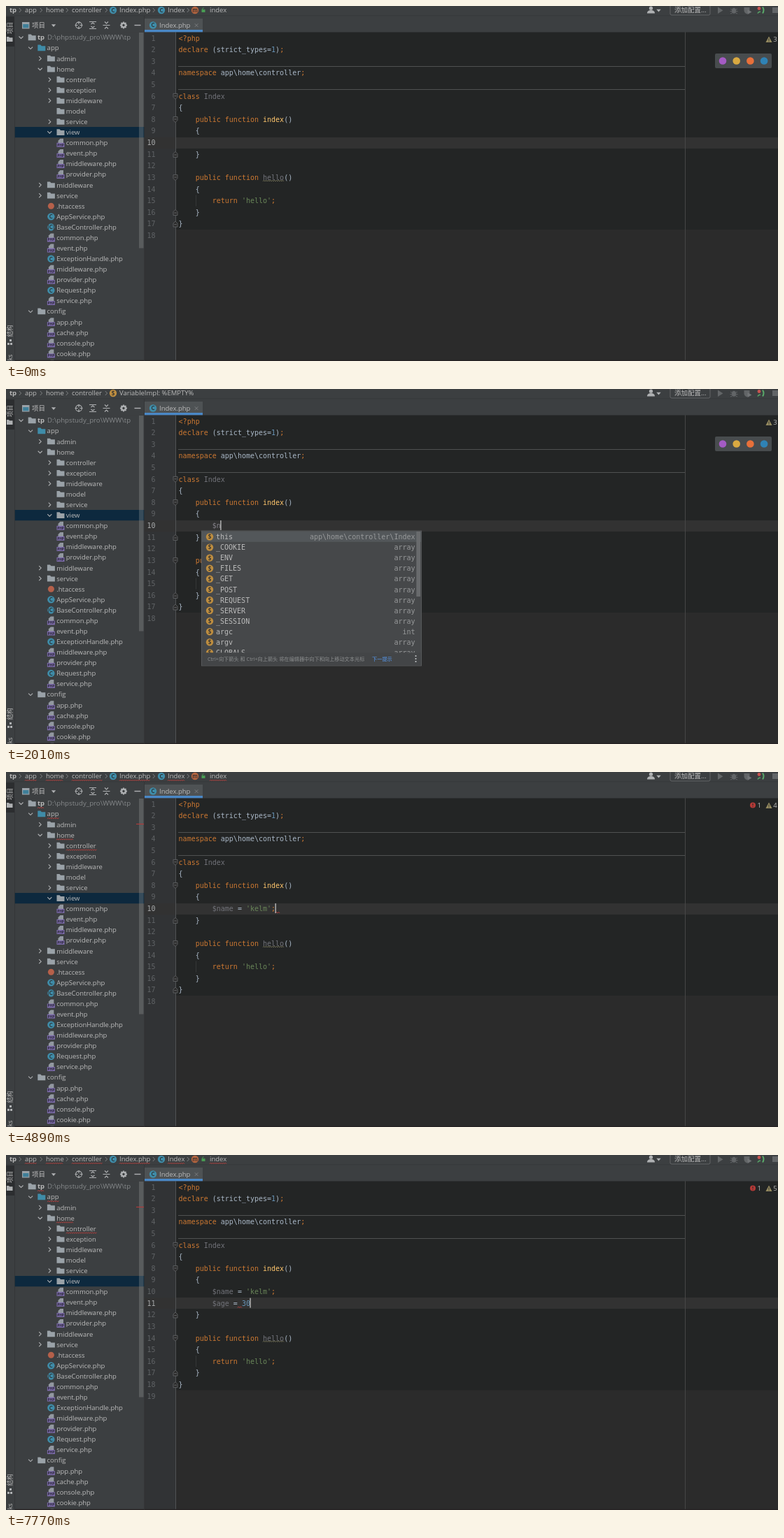
Recreate the animation shown at these times as an HTML page. Size 1103 by 508 pixels, loop 8 s.

```html
<!DOCTYPE html>
<html lang="zh">
<head>
<meta charset="utf-8">
<title>Editor</title>
<style>
html, body { margin: 0; width: 100%; height: 100%; overflow: hidden; background: #2b2b2b; }
svg { display: block; width: 100%; height: 100%; }
text { white-space: pre; font: 9.5px "Open Sans", "Noto Sans CJK SC", "Noto Sans CJK", sans-serif; fill: #bbb; }
.mono { font: 10px "DejaVu Sans Mono", monospace; fill: #a9b7c6; }
.end { text-anchor: end; }
.mid { text-anchor: middle; }
.line { fill: none; stroke: #afb1b3; stroke-width: 1.1; }
</style>
</head>
<body>
<svg id="stage" viewBox="0 0 1103 508"></svg>
<script>
const LOOP = 8000, COL = 6.02, LEFT = 246.6, ROW = 16.61;
const GREY = '#72737a', FRESH = '#85828a', RED = '#c8403e';
const stage = document.getElementById('stage');
const timed = [];

function el(tag, attrs, parent = stage) {
  const node = document.createElementNS('http://www.w3.org/2000/svg', tag);
  for (const k in attrs) node.setAttribute(k, attrs[k]);
  parent.appendChild(node);
  return node;
}
const group = parent => el('g', {}, parent);
const rect = (x, y, width, height, fill, parent, rx = 0) => el('rect', { x, y, width, height, fill, rx }, parent);
const circle = (cx, cy, r, fill, parent) => el('circle', { cx, cy, r, fill }, parent);
const path = (d, fill, parent) => el('path', { d, fill }, parent);
const line = (d, parent, stroke = '#afb1b3', w = 1.1) =>
  el('path', { d, class: 'line', style: `stroke:${stroke};stroke-width:${w}` }, parent);
function text(x, y, str, parent, style = '', cls = '') {
  const node = el('text', { x, y: y + 3.4, style, class: cls }, parent);
  node.textContent = str;
  return node;
}
function during(node, ...spans) {
  timed.push([node, spans]);
  return node;
}
function zigzag(x1, x2, y) {
  let d = `M${x1} ${y + 1}`;
  for (let x = x1 + 1.5, up = 1; x <= x2; x += 1.5, up = !up) d += `L${x} ${up ? y - 0.7 : y + 1}`;
  return d;
}
const wave = (x1, x2, y, parent, color = RED) => line(zigzag(x1, x2, y), parent, color, 0.8);
const colX = n => LEFT + COL * n;
const rowY = n => 46 + ROW * (n - 1);

// Icons
function letter(x, y, ch, fill, parent) {
  circle(x, y, 5.2, fill, parent);
  text(x, y - 0.5, ch, parent, 'font-size:8px;font-weight:600;fill:#2a2c2e', 'mid');
}
const classIcon = (x, y, p) => letter(x, y, 'C', '#3f8ca8', p);
const varIcon = (x, y, p) => letter(x, y, '$', '#bd8d40', p);
function methodIcon(x, p) {
  letter(x, 6, 'm', '#b5653f', p);
  rect(x + 9.5, 5, 5, 4, '#499c54', p);
  line(`M${x + 10.5} 5v-1.5q1.5 -1.5 2.5 0`, p, '#499c54', 0.9);
}
const folder = (x, y, fill, p) => path(`M${x} ${y - 4.5}h4l1.6 1.7h5.4v7h-11z`, fill, p);
function phpIcon(x, y, p) {
  path(`M${x + 5} ${y - 6}h4.5v7h-7.5v-4z`, '#9298a0', p);
  rect(x, y, 11, 6, '#7d6cab', p);
  text(x + 5.5, y + 1.5, 'PHP', p, 'font-size:4.8px;font-weight:700;fill:#2a2638', 'mid');
}
function chevron(x, y, open, p) {
  line(open ? `M${x - 3} ${y - 1.5}l3 3l3 -3` : `M${x - 1.5} ${y - 3}l3 3l-3 3`, p);
}
const triangle = (x, y, fill = '#afb1b3', p) => path(`M${x - 3.2} ${y - 1.7}h6.4l-3.2 3.6z`, fill, p);

// Editor
rect(0, 0, 1103, 508, '#2b2b2b');
const block = rect(243, 37, 860, 283, '#232525');
rect(198, 37, 45, 471, '#313335');
const band = rect(198, 188, 905, 16, '#323232');
line('M970.5 37V508', stage, '#464646', 1);
line('M242.5 37V508', stage, '#515354', 1);
line('M246 86.5H970M246 119.5H970', stage, '#4f5151', 1);

const RULES = /('[^']*'|<\?php|\b(?:declare|namespace|class|public|function|return)\b|;|\b\d+\b|\$\w+|\bIndex\b|\bindex\b|hello(?=\())/;
function tint(s, varColor) {
  if (s[0] === "'") return '#6a8759';
  if (s[0] === '$') return varColor;
  if (/^\d/.test(s)) return '#6897bb';
  if (s === 'index') return '#ffc66d';
  return /^(Index|hello)$/.test(s) ? GREY : '#cc7832';
}
function paint(node, src, varColor) {
  node.textContent = '';
  src.split(RULES).forEach((s, i) => {
    if (!s) return;
    const span = el('tspan', i % 2 ? { fill: tint(s, varColor) } : {}, node);
    span.textContent = s;
  });
}
function codeLine(n, src, parent) {
  const bare = src.trimStart();
  const node = text(colX(src.length - bare.length), rowY(n) + 0.2, '', parent, '', 'mono');
  paint(node, bare, GREY);
  return node;
}
function fold(n, up, parent) {
  const g = el('g', { transform: `translate(242 ${rowY(n) + 0.3}) scale(1 ${up ? -1 : 1})` }, parent);
  el('path', { d: 'M-3 -4h6v5l-3 3l-3 -3z', fill: '#2b2b2b', stroke: '#66696b', 'stroke-width': 0.8 }, g);
  line('M-1.6 -0.6h3.2', g, '#7a7d7f', 0.8);
}
const numbers = [];
for (let n = 1; n <= 19; n++) numbers[n] = text(213.5, rowY(n) + 0.2, n, stage, '', 'mono end');
during(numbers[19], [5160, LOOP]);

const code = group();
const rest = group();
codeLine(1, '<?php', code);
codeLine(2, 'declare (strict_types=1);', code);
codeLine(4, 'namespace app\\home\\controller;', code);
codeLine(6, 'class Index', code);
codeLine(7, '{', code);
codeLine(8, '    public function index()', code);
codeLine(9, '    {', code);
codeLine(11, '    }', rest);
codeLine(13, '    public function hello()', rest);
codeLine(14, '    {', rest);
codeLine(15, "        return 'hello';", rest);
codeLine(16, '    }', rest);
codeLine(17, '}', rest);
line('M271.5 270.5v16', rest, '#343636', 1);
wave(367, 397, 250, rest, '#7d7a5c');
fold(6, false, code);
fold(8, false, code);
fold(13, false, rest);
[11, 16, 17].forEach(n => fold(n, true, rest));

// Typing: time, text, caret column, wave [from, to]
const TYPED = {
  10: [
    [0, ''], [1140, '', 8], [1400, '$', 9], [2010, '$n', 10], [2080, '$na', 11], [2150, '$nam', 12],
    [2220, '$name', 13], [2550, '$name', 13, [8, 14]], [2680, '$name ', 14, [8, 14]],
    [2820, '$name =', 15], [2950, '$name = ', 16], [3220, "$name = ''", 17],
    [3290, "$name = ''", 17, [18, 19]], [3830, "$name = 'k'", 18, [19, 20]],
    [3900, "$name = 'ke'", 19, [20, 21]], [4100, "$name = 'kel'", 20, [21, 22]],
    [4170, "$name = 'kelm'", 21, [22, 23]], [4630, "$name = 'kelm'", 22, [22, 23]],
    [4890, "$name = 'kelm';", 23, [23, 24]], [5160, "$name = 'kelm';", 0, [23, 24]],
    [6690, "$name = 'kelm';"]
  ],
  11: [
    [0, ''], [5160, '', 8], [5360, '$', 9], [5640, '$a', 10], [5700, '$ag', 11], [5770, '$age', 12],
    [6160, '$age ', 13], [6300, '$age =', 14], [6430, '$age = ', 15], [6690, '$age = ', 15, [14, 15]],
    [7550, '$age = ', 0, [14, 15]], [7700, '$age = 3', 16, [14, 15]], [7770, '$age = 30', 17, [14, 15]]
  ]
};
const typed = [10, 11].map(n => ({
  steps: TYPED[n], y: rowY(n),
  greyAt: n === 10 ? 3290 : 6690,
  node: codeLine(n, '        '),
  wave: wave(0, 0, 0),
  caret: rect(0, rowY(n) - 7.5, 1.2, 14, '#d0d0d0'),
  key: ''
}));
function typeAt(row, t) {
  const step = row.steps.findLast(s => s[0] <= t);
  const [, src, col, under] = step;
  const key = step[0] + (t >= row.greyAt ? 'g' : '');
  if (key === row.key) return;
  row.key = key;
  paint(row.node, src, t >= row.greyAt ? GREY : FRESH);
  row.wave.setAttribute('d', under ? zigzag(colX(under[0]), colX(under[1]), row.y + 5.5) : '');
  row.caret.style.display = col ? '' : 'none';
  row.caret.setAttribute('x', colX(col || 0) - 0.5);
}

// Inspection badge
path('M1090 43.5l4.5 8.5h-9z', '#978c60');
line('M1090 46.5v3M1090 50.3v.9', stage, '#2b2b2b', 1);
[['3', 0, 3620], ['4', 3620, 7090], ['5', 7090, LOOP]].forEach(([s, a, b]) => during(text(1096.3, 48, s), [a, b]));
const errors = during(group(), [3620, LOOP]);
circle(1067, 47.5, 4, '#b53a37', errors);
line('M1067 45v3M1067 49v1', errors, '#2b2b2b', 1.1);
text(1073.5, 48, '1', errors);

// Browser buttons
const browsers = group();
rect(1013, 68, 81, 21, '#484c4e', browsers, 2);
['#a45bc4', '#d9a941', '#e8703a', '#2f82b5'].forEach((c, i) => circle(1024 + i * 19.7, 78.5, 5.3, c, browsers));

// Project tree
rect(0, 0, 198, 508, '#3c3f41');
rect(12, 173, 186, 15.2, '#0d293e');
const TREE = [
  '0v tp', '1v app', '2> admin', '2v home', '3> controller', '3> exception', '3> middleware',
  '3- model', '3> service', '3v view', '3p common.php', '3p event.php', '3p middleware.php',
  '3p provider.php', '2> middleware', '2> service', '2h .htaccess', '2c AppService.php',
  '2a BaseController.php', '2p common.php', '2p event.php', '2c ExceptionHandle.php',
  '2p middleware.php', '2p provider.php', '2c Request.php', '2p service.php', '1v config',
  '2p app.php', '2p cache.php', '2p console.php', '2p cookie.php', '2p database.php'
];
TREE.forEach((item, i) => {
  const y = 45 + 15.08 * i, x = 45 + 13.6 * item[0], kind = item[1], icon = x - 13.3;
  if ('v>'.includes(kind)) chevron(x - 23.5, y, kind === 'v');
  if ('v>-'.includes(kind)) folder(icon, y, i === 1 ? '#3f8ca8' : '#9aa2a8');
  if (kind === 'p') phpIcon(icon, y);
  if (kind === 'h') circle(icon + 5.5, y, 4.5, '#b5604a');
  if ('ca'.includes(kind)) classIcon(icon + 5.5, y);
  if (kind === 'a') line(`M${icon + 1.7} ${y - 5}v10M${icon + 9.3} ${y - 5}v10`, stage, '#3c3f41', 0.9);
  text(x, y, item.slice(3), stage, i ? '' : 'font-weight:700');
});
text(59, 45, 'D:\\phpstudy_pro\\WWW\\tp', stage, 'fill:#85888a;font-size:9.7px');
rect(190, 38, 6.5, 308.5, 'rgba(166,166,166,.28)');
const marks = during(group(), [2550, LOOP]);
[[45, 55, 0], [59, 76, 1], [72, 97, 3], [86, 130, 4]].forEach(([a, b, i]) => wave(a, b, 51 + 15.08 * i, marks));
during(line('M186 74.5h11', stage, '#b03a3a', 1.2), [2750, LOOP]);
rect(12, 506.7, 1091, 1.3, '#272324');

// Left stripe
rect(0, 14, 12, 494, '#3c3f41');
rect(0, 15, 12, 43, '#2c2e30');
rect(12, 14, 0.8, 494, '#323436');
const turned = (y, s) => el('g', { transform: `translate(5.5 ${y}) rotate(-90)` }).appendChild(text(0, 0, s, stage, 'font-size:8.6px', 'mid'));
turned(31.5, '项目');
path('M1 44h3l1.2 1.3h4.3v5.7h-8.5z', '#afb1b3');
turned(465, '结构');
path('M2 482h3v3h-3zM6 482h3v3h-3zM5 477h3v3h-3z', '#afb1b3');
turned(503, 'ks');

// Top bars
rect(0, 0, 1103, 14, '#3c3f41');
rect(12, 14, 1091, 23.5, '#3c3f41');
rect(0, 13.5, 1103, 0.8, '#343638');
rect(197.3, 14, 0.8, 494, '#323436');
rect(23, 23, 10.5, 9.5, '#9aa2a8');
rect(24.2, 26, 8.1, 5.3, '#3f7f99');
text(37, 27.5, '项目');
triangle(68, 28);
circle(104, 27.5, 4.4, 'none').setAttribute('class', 'line');
line('M104 22v4M104 29v4M98.5 27.5h4M105.5 27.5h4');
line('M119 22.5h10M119 32.5h10M121.5 26l2.5 -2l2.5 2M121.5 29l2.5 2l2.5 -2');
line('M138.5 27.5h10M141 22.5l2.5 2.5l2.5 -2.5M141 32.5l2.5 -2.5l2.5 2.5');
circle(168, 27.5, 2.8, 'none').setAttribute('style', 'stroke:#afb1b3;stroke-width:2.2');
line('M168 22.5v2M168 30.5v2M163 27.5h2M171 27.5h2M164.5 24l1.5 1.5M170 29.5l1.5 1.5M171.5 24l-1.5 1.5M166 29.5l-1.5 1.5', stage, '#afb1b3', 1.8);
line('M183.5 27.5h9', stage, '#afb1b3', 1.4);

rect(198, 18, 83, 19, '#4e5254');
rect(198, 34, 83, 3.3, '#4a88c7');
classIcon(210, 27.5);
text(219, 27.5, 'Index.php');
line('M269.8 25.3l4.6 4.6M274.4 25.3l-4.6 4.6', stage, '#7f8284', 0.9);

circle(921.5, 3.2, 2.6, '#afb1b3');
path('M916 10.5q0 -4.5 5.5 -4.5t5.5 4.5z', '#afb1b3');
triangle(932.5, 6.5);
el('rect', { x: 949, y: -4, width: 57, height: 17, rx: 2, fill: 'none', stroke: '#626567' });
text(955, 6, '添加配置...');
path('M1017 1.5l7.5 4.7l-7.5 4.7z', '#626567');
el('ellipse', { cx: 1040, cy: 6.8, rx: 3, ry: 4, fill: '#626567' });
line('M1035 4l3 1.5M1045 4l-3 1.5M1034.5 7.5h11M1035 11l3 -1.5M1045 11l-3 -1.5', stage, '#626567', 1);
path('M1054.5 2h8v4q-1 4 -4 5.5q-4 -2 -4 -5.5z', '#626567');
path('M1059.5 5l6 3.5l-6 3.5z', '#727577');
line('M1081 1.5q3 4.5 0 9', stage, '#59a869', 2);
circle(1076, 3.5, 2.4, '#c75450');
line('M1074 10.5q1.5 -3 4 -2', stage, '#59a869', 1.6);
rect(1095, 2, 8, 8, '#626567');

// Breadcrumbs
const sep = (x, p) => line(`M${x - 1.2} 3l2.8 3l-2.8 3`, p, '#85888a', 0.9);
text(5, 6, 'tp', stage, 'font-weight:700');
[[27, 'app'], [57, 'home'], [94, 'controller']].forEach(([x, s]) => text(x, 6, s));
[20, 50, 87, 143].forEach(x => sep(x));
const crumbMarks = during(group(), [3290, LOOP]);
[[27, 44], [57, 82], [94, 138]].forEach(([a, b]) => wave(a, b, 11.7, crumbMarks));

const fileCrumbs = during(group(), [0, 1470], [3220, 5490], [6230, LOOP]);
classIcon(153, 6, fileCrumbs);
text(162, 6, 'Index.php', fileCrumbs);
sep(211, fileCrumbs);
classIcon(222, 6, fileCrumbs);
text(231, 6, 'Index', fileCrumbs);
sep(260, fileCrumbs);
methodIcon(270, fileCrumbs);
const fileMarks = during(group(fileCrumbs), [3290, LOOP]);
wave(162, 206, 11.7, fileMarks);
wave(231, 255, 11.7, fileMarks);
during(text(291, 6, 'index', fileCrumbs), [0, 5160], [5490, LOOP]);
during(wave(291, 315, 11.7, fileCrumbs), [4890, 5160], [6690, LOOP]);
during(text(288, 6, 'dex', fileCrumbs), [5160, 5490]);

function varCrumb(name, ...spans) {
  const g = during(group(), ...spans);
  varIcon(153, 6, g);
  text(162, 6, 'VariableImpl: ' + name, g);
  return g;
}
varCrumb('%EMPTY%', [1470, 2550]);
varCrumb('name', [2550, 3220]);
wave(162, 267, 11.7, varCrumb('%EMPTY%', [5490, 6230]));

// Completion popup
el('rect', { x: 280, y: 204, width: 313, height: 173.5 }, el('clipPath', { id: 'list' }, el('defs', {})));
const GLOBALS = '_COOKIE _ENV _FILES _GET _POST _REQUEST _SERVER _SESSION argc argv GLOBALS'.split(' ')
  .map(s => [s, s === 'argc' ? 'int' : 'array']);
const ITEMS = [['this', 'app\\home\\controller\\Index'], ...GLOBALS];

function popup(dy, items, hint, linkX, span) {
  const g = during(el('g', { transform: `translate(0 ${dy})` }), span);
  el('rect', { x: 279.5, y: 203, width: 314, height: 193, fill: '#46484a', stroke: '#5a5c5e', 'stroke-width': 0.9 }, g);
  const list = el('g', { 'clip-path': 'url(#list)' }, g);
  rect(280, 203.8, 313, 15, '#53575a', list);
  items.forEach(([name, type], i) => {
    const y = 211.5 + 15.08 * i;
    varIcon(291, y, list);
    text(300, y + 0.2, name, list, 'fill:#bbb', 'mono');
    text(584.5, y + 0.2, type, list, 'fill:#97999a', 'mono end');
  });
  rect(586.3, 204, 5.7, 93, '#696b6d', g);
  rect(280, 377.5, 313, 18, '#434547', g);
  text(288, 385.7, hint, g, 'font-size:7.2px;fill:#8c8e8f');
  text(linkX, 385.7, '下一提示', g, 'font-size:7.2px;fill:#589df6');
  [382, 386, 390].forEach(y => circle(585.5, y, 1.1, '#c0c2c3', g));
}
popup(0, ITEMS, 'Ctrl+向下箭头 和 Ctrl+向上箭头 将在编辑器中向下和向上移动文本光标', 523, [1600, 2080]);
popup(16.4, [['name', 'string'], ...ITEMS], '再次按 Ctrl+空格 以查看全局变体', 402, [5430, 5700]);

// Text pointer
const pointer = during(line('M-2 -5h4M0 -5v10M-2 5h4', stage, '#191a1a', 0.9), [70, 1140]);
const span = (t, a, b) => Math.min(1, Math.max(0, (t - a) / (b - a)));
const ease = p => p * p * (3 - 2 * p);

function draw(t) {
  const grown = t >= 5160;
  for (const [node, spans] of timed)
    node.style.display = spans.some(([a, b]) => t >= a && t < b) ? '' : 'none';
  typed.forEach(row => typeAt(row, t));
  rest.setAttribute('transform', `translate(0 ${grown ? ROW : 0})`);
  block.setAttribute('height', grown ? 299.6 : 283);
  band.setAttribute('y', grown ? 204 : 188);
  numbers.forEach((n, i) => n.style.fill = i === (grown ? 11 : 10) ? '#a9abac' : '#606366');
  browsers.style.opacity = 1 - span(t, 2580, 2880);
  const p = ease(span(t, 70, 860)), q = ease(span(t, 930, 1140));
  pointer.setAttribute('transform', `translate(${1006 - 696 * p - 106 * q} ${497 - 298 * p - 156 * q})`);
}
const start = performance.now();
function tick() {
  draw((performance.now() - start) % LOOP);
  requestAnimationFrame(tick);
}
tick();
</script>
</body>
</html>
```
